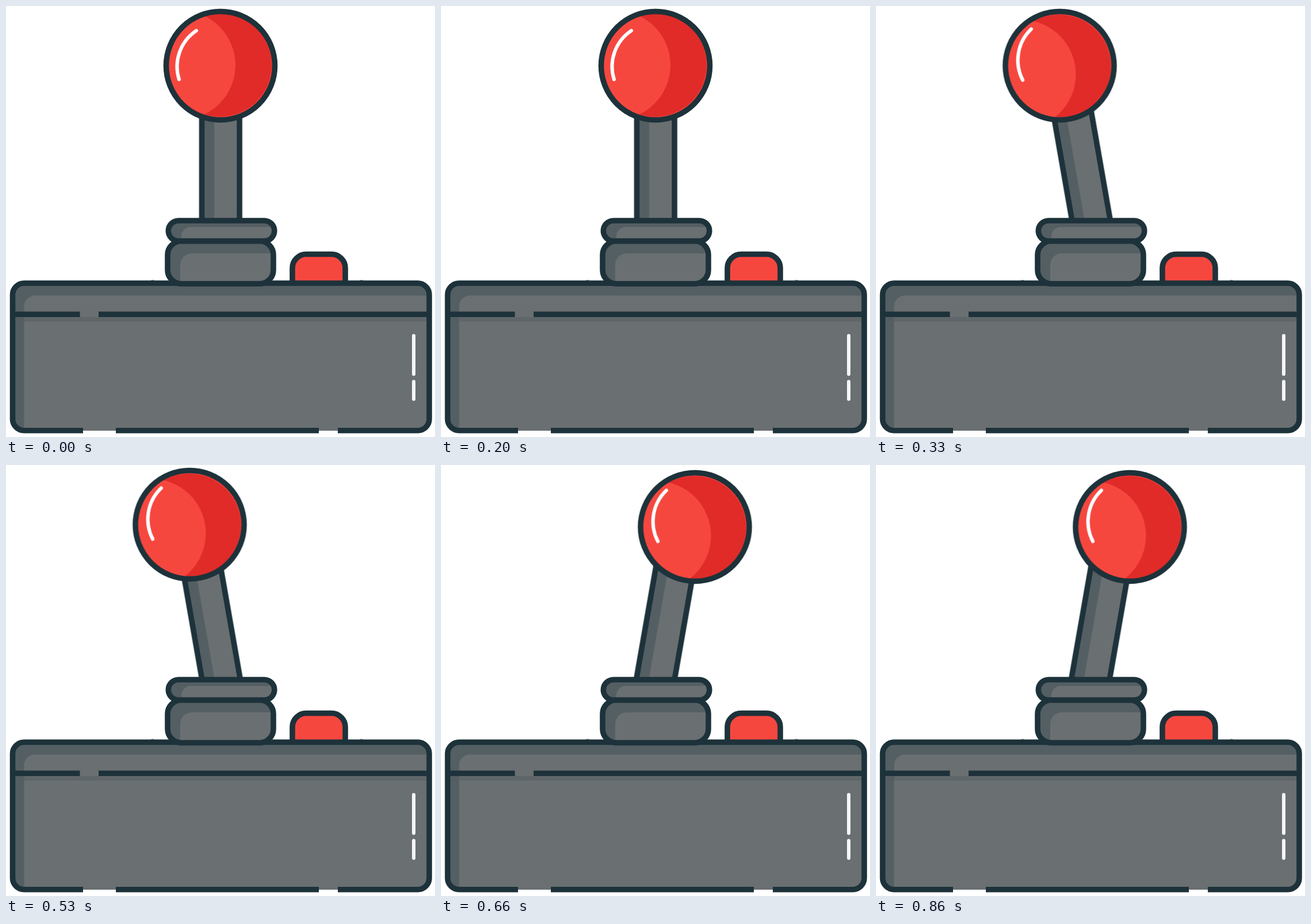
Animation, 746 px wide and 751 px high, one loop 0.99 s. Source, as an HTML page:

```html
<!DOCTYPE html>
<html lang="en">
<head>
<meta charset="utf-8">
<title>Joystick</title>
<style>
  html, body { margin: 0; width: 100%; height: 100%; overflow: hidden; background: #fff; }
  svg { display: block; width: 746px; height: 751px; }

  .line { fill: none; stroke: #1d323a; stroke-width: 9.6; }
  .dark { fill: #545f63; }
  .light { fill: #6a6f71; }
  .red { fill: #f6473f; }
  .deep { fill: #e02b29; }
  .shine { fill: none; stroke: #fff; stroke-width: 6; stroke-linecap: round; }

  /* Three held poses: upright, left, right */
  .stick, .ball, .glow, .core, .glint { animation: 990ms step-end infinite; }
  .stick { animation-name: stick; }
  .ball { animation-name: ball; }
  .glow { animation-name: glow; }
  .core { animation-name: core; }
  .glint { animation-name: glint; }

  @keyframes stick {
    0% { transform: translate(373.3px, 370px); }
    33.333% { transform: translate(373.5px, 370px) rotate(-9.9deg); }
    66.667%, 100% { transform: translate(373.5px, 370px) rotate(9.9deg); }
  }
  @keyframes ball {
    0% { transform: translate(373px, 104px); }
    33.333% { transform: translate(319.5px, 104px); }
    66.667%, 100% { transform: translate(441.5px, 108px); }
  }
  @keyframes glow {
    0% { transform: translate(-69px, -1px); }
    33.333%, 100% { transform: translate(-67px, 15px); }
  }
  @keyframes core {
    0% { transform: translate(-1.2px, -1px); }
    33.333%, 100% { transform: translate(-1.2px, 1px); }
  }
  @keyframes glint {
    0% { transform: none; }
    33.333%, 100% { transform: translate(2.4px, -11px) rotate(-10deg); }
  }
</style>
</head>
<body>
<svg viewBox="0 0 746 751">
  <defs>
    <clipPath id="round"><circle r="92"/></clipPath>
    <clipPath id="box"><rect x="11.5" y="483" width="724.5" height="257" rx="20"/></clipPath>
    <clipPath id="ring"><rect x="282.3" y="374" width="184.5" height="35.5" rx="17.7"/></clipPath>
    <clipPath id="cup"><rect x="281" y="409.5" width="184" height="74.5" rx="24"/></clipPath>
  </defs>

  <g class="stick">
    <rect class="light" x="-33" y="-200" width="66" height="215"/>
    <rect class="dark" x="-33" y="-200" width="21.7" height="215"/>
    <path class="line" d="M-32.8-200V15M32.8-200V15"/>
  </g>

  <g class="ball">
    <g clip-path="url(#round)">
      <circle class="red" r="92"/>
      <circle class="deep core" r="90"/>
      <circle class="red glow" r="95"/>
    </g>
    <path class="shine glint" d="M-42-61A75 75 0 0 0-72 24"/>
    <circle class="line" r="94.5"/>
  </g>

  <!-- Button -->
  <path class="red" d="M498 484V457Q498 432.5 522 432.5H566Q590 432.5 590 457V484Z"/>
  <path class="line" d="M498 484V456.5A24 24 0 0 1 522 432.5H566A24 24 0 0 1 590 456.5V484"/>

  <!-- Base -->
  <g clip-path="url(#box)">
    <rect class="dark" x="11" y="483" width="726" height="258"/>
    <path class="light" d="M31.5 741V523A18.5 18.5 0 0 1 50 504.5H737V741Z"/>
    <rect class="dark" x="11" y="542" width="726" height="8" opacity=".5"/>
  </g>
  <path class="line" d="M134 739.7H31.5A20 20 0 0 1 11.5 719.7V503A20 20 0 0 1 31.5 483H716A20 20 0 0 1 736 503V719.7A20 20 0 0 1 716 739.7H577M544 739.7H191M12 537.3H128.5M161 537.3H736"/>
  <path d="M251 478.5Q255 476.5 259 478.5M614 478.5Q618 476.5 622 478.5" fill="#1d323a"/>
  <path class="shine" style="stroke:#f5f5f7" d="M709 574.5V641.5M709 654.5V685"/>

  <!-- Collar -->
  <g clip-path="url(#cup)">
    <rect class="dark" x="281" y="409" width="185" height="76"/>
    <path class="light" d="M303 485V451A20 20 0 0 1 323 431H466V485Z"/>
  </g>
  <rect class="line" x="281" y="409.5" width="184" height="74.5" rx="24"/>
  <g clip-path="url(#ring)">
    <rect class="dark" x="282" y="373" width="186" height="38"/>
    <path class="light" d="M305 411V401A16 16 0 0 1 321 385H468V411Z"/>
  </g>
  <rect class="line" x="282.3" y="374" width="184.5" height="35.5" rx="17.7"/>
</svg>
</body>
</html>
```
